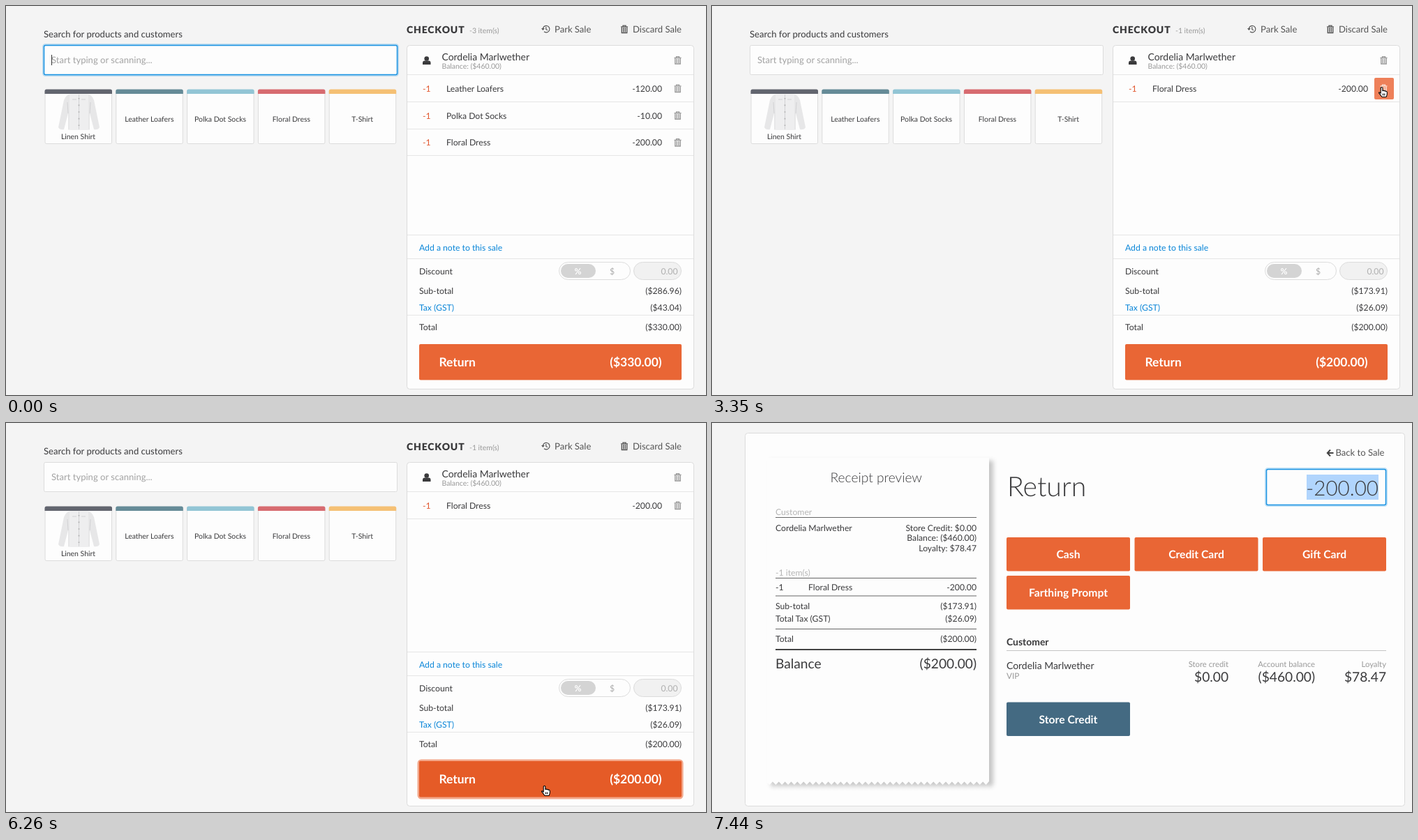
Animation of 1003x558 px, one loop 7980 ms. Source, as an HTML page:

```html
<!DOCTYPE html>
<html lang="en">
<head>
<meta charset="utf-8">
<title>Checkout return</title>
<style>
  html, body { margin: 0; width: 100%; height: 100%; overflow: hidden; background: #f4f4f4; }
  svg { display: block; width: 100%; height: 100%; }
  text { font-family: Lato, sans-serif; text-rendering: geometricPrecision; white-space: pre; }
  .paper { fill: #fdfdfd; filter: drop-shadow(6px 4px 3px rgba(0, 0, 0, .22)); }
</style>
</head>
<body>
<svg id="stage" viewBox="0 0 1003 558" xmlns="http://www.w3.org/2000/svg"></svg>
<script>
const LOOP = 7980;
const INK = '#3a3a3c', GREY = '#999', LINE = '#e6e6e6', EDGE = '#dcdcdc';
const BLUE = '#1a93e2', LINK = '#0a86d8', ORANGE = '#e96635', PRESSED = '#e55b27';
const SHOPPER = 'Cordelia Marlwether';
const ITEMS = [['Leather Loafers', 120], ['Polka Dot Socks', 10], ['Floral Dress', 200]];
const TILES = [['Linen Shirt', '#62656f'], ['Leather Loafers', '#658b97'], ['Polka Dot Socks', '#92c5d5'],
               ['Floral Dress', '#d76b70'], ['T-Shirt', '#f5c074']];
const ROW = 38.75;

// Type sizes
const S = 10.45, M = 12.2, L = 13.07, XL = 13.94, BTN = 15.68, BIG = 19.16;

// y is the middle of the capitals
const text = (x, y, size, str, { fill = INK, anchor = 'start', weight = 400, extra = '' } = {}) =>
  `<text x="${x}" y="${y + size * .36}" font-size="${size}" fill="${fill}" text-anchor="${anchor}" font-weight="${weight}" ${extra}>${str}</text>`;
const right = (x, y, size, str, opts) => text(x, y, size, str, { ...opts, anchor: 'end' });
const mid = (x, y, size, str, opts) => text(x, y, size, str, { ...opts, anchor: 'middle' });
const rect = (x, y, w, h, fill, r = 0, extra = '') =>
  `<rect x="${x}" y="${y}" width="${w}" height="${h}" rx="${r}" fill="${fill}" ${extra}/>`;
const box = (x, y, w, h, stroke, r = 3, fill = '#fdfdfd') =>
  rect(x + .5, y + .5, w - 1, h - 1, fill, r, `stroke="${stroke}"`);
const rule = (x1, x2, y, color = LINE, h = 1) => rect(x1, y, x2 - x1, h, color);
const money = v => `($${v.toFixed(2)})`;

const trash = (x, y, color) => `<g transform="translate(${x} ${y})" fill="none" stroke="${color}">
  <path d="M-5-3.7H5M-2-4V-5.4H2V-4" stroke-width="1.3"/>
  <path d="M-3.7-3V5H3.7V-3M-1.3-2.5V4M1.3-2.5V4" stroke-width="1.4"/></g>`;

const focusRing = (id, x, y, w, h) => `<g id="${id}" fill="none" stroke="${BLUE}">
  <rect x="${x - .5}" y="${y - .5}" width="${w + 1}" height="${h + 1}" rx="3" stroke-width="3" opacity=".28"/>
  <rect x="${x + .5}" y="${y + .5}" width="${w - 1}" height="${h - 1}" rx="2" stroke-width="1.5"/></g>`;

const shirt = `<path d="M92 126.500Q86 127 83 135L75 174Q77 178 83 177L89 154V177.500H120V154L126 177Q132 178 134 174L126 135Q123 127 117 126.500Z" fill="#e7e7e8"/>
  <path d="M91 127V177.500H118V127Z" fill="#eeeeef"/>
  <path d="M104.500 127V177M89 154L88 138M120 154L121 138M95 134H101M108 134H114" stroke="#d2d2d4" fill="none"/>
  <path d="M104.500 132V177" stroke="#aaa" stroke-width="1.6" stroke-dasharray="1.6 8"/>`;

function tile([name, color], i) {
  const x = 56 + i * 101.8, cx = x + 47.5;
  return box(x - .5, 120, 96.5, 78, EDGE, 2) + `<path d="M${x - .5} 126V122q0-2.500 2.500-2.500h91.500q2.500 0 2.500 2.500V126Z" fill="${color}"/>` +
    (i ? '' : shirt) + mid(cx, i ? 162 : 187, S, name);
}

function saleRow([name, price], i) {
  const y = 118.500 + i * ROW;
  return text(597, y, M, '-1', { fill: '#e2582f' }) + text(631, y, M, name) +
    right(940, y, M, '-' + price.toFixed(2)) + trash(962.5, y, GREY) + rule(575, 985, Math.round(y + 18.4));
}

function saleState(count) {
  const left = ITEMS.slice(-count);
  const total = left.reduce((sum, item) => sum + item[1], 0), tax = total * 3 / 23;
  return text(664, 35, S, `-${count} item(s)`, { fill: GREY }) + left.map(saleRow).join('') +
    right(968, 409, M, money(total - tax)) + right(968, 432.5, M, money(tax)) + right(968, 461, M, money(total)) +
    right(939.5, 511, 17.42, money(total), { fill: '#fff', weight: 700 });
}

const salePage = () =>
  text(54, 40, L, 'Search for products and customers') + box(54, 56, 507, 43, EDGE, 2) + focusRing('searchFocus', 54, 56, 507, 43) +
  text(65, 77.5, L, 'Start typing or scanning...', { fill: '#a3a3a3' }) + rect(65, 70, 1, 15, '#333', 0, 'id="caret"') +
  TILES.map(tile).join('') +
  text(574, 33.5, XL, 'CHECKOUT', { weight: 900, extra: 'letter-spacing=".87"' }) +
  `<g fill="none" stroke="#555" stroke-width="1.200"><path d="M769.300 33A4.800 4.800 0 1 1 771 36.800M773.800 30V33.500L776 34.700"/></g>
   <path d="M767 32H771.800L769.400 35Z" fill="#555"/>` +
  text(786, 33.5, L, 'Park Sale', { fill: '#555' }) + trash(886, 33.5, '#555') + text(898, 33.5, L, 'Discard Sale', { fill: '#555' }) +
  box(574, 56, 412, 494, EDGE, 4) +
  `<path d="M597 84V81.500Q597 78.500 600 78.500H605.500Q608.500 78.500 608.500 81.500V84Z" fill="${INK}"/><circle cx="602.700" cy="75.500" r="3.300" fill="${INK}"/>` +
  text(624.5, 72.5, XL, SHOPPER) + text(624.5, 86, S, 'Balance: ($460.00)', { fill: GREY }) + trash(962.5, 78, GREY) +
  rule(575, 985, 98) + rule(575, 985, 328) + rule(575, 985, 362) + rule(575, 985, 443) +
  text(592, 346.5, M, 'Add a note to this sale', { fill: LINK }) + text(592, 381, M, 'Discount') +
  box(792, 367, 103, 26, EDGE, 13) + rect(795, 370, 50, 20, '#d4d4d4', 10) +
  mid(819.5, 380.5, M, '%', { fill: '#fff', weight: 700 }) + mid(868.5, 380.5, M, '$', { fill: '#aaa' }) +
  box(899, 367, 69, 26, EDGE, 13, '#f1f1f1') + right(962.5, 380.5, M, '0.00', { fill: '#b0b0b0' }) +
  text(592, 409, M, 'Sub-total') + text(592, 432.5, M, 'Tax (GST)', { fill: LINK }) + text(592, 461, M, 'Total') +
  rect(591, 484, 378, 54, 'none', 4, 'id="glow" stroke="#f3a78a" stroke-width="3"') +
  rect(592, 485, 376, 51.5, ORANGE, 2) + rect(592, 485, 376, 51.5, PRESSED, 2, 'id="press"') +
  text(620.5, 511, 17.42, 'Return', { fill: '#fff', weight: 700 }) +
  '<g id="state"></g><g id="hover">' + rect(949, 103, 28, 31, '#ee8059', 2) + trash(962.5, 118.5, '#fbe3da') + '</g>';

function paper() {
  let d = 'M78 50H397V514';
  for (let x = 397, i = 1; x > 82; i++) d += `L${x -= 4.43} ${i % 2 ? 519 : 514.5}`;
  return `<path class="paper" d="${d}L78 516Z"/>`;
}

function payButton(label, col, y, fill = ORANGE) {
  const x = 422 + col * 183.5;
  return rect(x, y, 177, 48.5, fill, 2) + mid(x + 88.5, y + 24.5, BTN, label, { fill: '#fff', weight: 700 });
}

const receiptLine = (y, label, value) => text(91, y, M, label) + right(379, y, M, value);
const account = (x, label, value) =>
  right(x, 346, 11.3, label, { fill: GREY }) + right(x, 364.5, BIG, value);

const payPage = () => box(47, 14, 946, 536, EDGE, 4) + paper() +
  mid(235.3, 78.5, BIG, 'Receipt preview', { weight: 300 }) +
  text(91, 128, M, 'Customer', { fill: '#b5b5b5' }) + rule(91, 379, 135, '#666') +
  receiptLine(150.5, SHOPPER, 'Store Credit: $0.00') +
  right(379, 165, M, 'Balance: ($460.00)') + right(379, 179.5, M, 'Loyalty: $78.47') +
  text(91, 215, M, '-1 item(s)', { fill: '#b5b5b5' }) + rule(91, 379, 222, '#666') +
  receiptLine(235.5, '-1', '-200.00') + text(138, 235.5, M, 'Floral Dress') + rule(91, 379, 247.5, '#666') +
  receiptLine(263, 'Sub-total', '($173.91)') + receiptLine(281, 'Total Tax (GST)', '($26.09)') + rule(91, 379, 295, '#666') +
  receiptLine(310, 'Total', '($200.00)') + rule(91, 379, 324, '#444', 2) +
  text(91, 345, BIG, 'Balance') + right(379, 345, BIG, '($200.00)') +
  text(423, 90.5, 39.2, 'Return', { weight: 300 }) +
  '<path d="M890.500 43H882.500M886 38.500L881.800 43L886 47.500" fill="none" stroke="#444" stroke-width="2"/>' +
  text(893.5, 42.5, L, 'Back to Sale', { fill: '#555' }) +
  box(794, 66, 172, 52, EDGE, 2) + '<g id="amountFocus">' + rect(852, 74, 103, 36, '#b1d5fd') + focusRing('ring', 794, 66, 172, 52) + '</g>' +
  right(955, 93, 29.6, '-200.00', { weight: 300 }) +
  payButton('Cash', 0, 164) + payButton('Credit Card', 1, 164) + payButton('Gift Card', 2, 164) + payButton('Farthing Prompt', 0, 219) +
  text(422, 314, XL, 'Customer', { weight: 700 }) + rule(422, 966, 326, '#c4c4c4') +
  text(422, 347.5, XL, SHOPPER) + text(422, 363, 11.8, 'VIP', { fill: GREY }) +
  account(740, 'Store credit', '$0.00') + account(864, 'Account balance', '($460.00)') + account(966, 'Loyalty', '$78.47') +
  payButton('Store Credit', 0, 400.5, '#446a82');

const pointers = `<g id="pointer">
  <path id="arrow" d="M0 0V12.500L3 9.800L5 14.500L7.200 13.500L5.200 9H9Z" fill="#000" stroke="#fff" stroke-width="1"/>
  <path id="hand" d="M-1.300.9Q0-.8 1.300.9V5Q2.600 4 3.700 5.300Q5 4.600 6 6Q7.600 5.500 7.800 7.300V10Q7.500 12 6.500 14H.5Q-1.500 11.500-4 8.200Q-3.800 6.500-1.300 8.500Z M2 9V12M4.200 9V12" fill="#fff" stroke="#000" stroke-width="1.100"/></g>`;

const stage = document.getElementById('stage');
stage.innerHTML = rect(0, 0, 1003, 558, '#f4f4f4') +
  `<g id="sale">${salePage()}</g><g id="pay">${payPage()}</g>${pointers}`;
const el = {};
stage.querySelectorAll('[id]').forEach(node => el[node.id] = node);

// Held values: [time, value]
const COUNT = [[0, 3], [2030, 2], [3350, 1]];
const FOCUS = [[0, 1], [1850, .5], [1940, 0], [2030, .5], [2120, 1], [3260, .5], [3350, 0], [3440, 1], [6170, .4], [6260, 0]];
const CARET = [[0, 1], [450, 0], [960, 1], [1410, 0], [2270, 1], [2720, 0], [3260, 1], [3950, 0], [4460, 1], [5000, 0], [5540, 1], [6000, 0]];
const PRESS = [[0, 0], [6170, .5], [6260, 1]];
const SALE = [[0, 1], [6500, .6], [6580, .25], [6730, 0]];
const PAY = [[0, 0], [6500, .4], [6580, .75], [6730, 1]];
const SLIDE = [[0, 40], [6580, 34], [6730, 22], [6880, 0]];
const held = (track, t) => track.findLast(key => key[0] <= t)[1];

// Pointer path: [time, x, y], sampled every 90 ms
const PATH = [[600, 994, 191], [780, 980, 165], [1050, 959.5, 116.5], [3590, 959.5, 116.5], [3770, 978, 150], [3950, 955, 205],
  [4290, 869, 243], [4380, 849, 261], [4460, 832, 318], [4550, 806, 381], [4820, 795, 425], [5000, 783, 470], [5150, 773, 497],
  [5330, 772, 501.5], [5580, 771.5, 520.5], [6880, 771.5, 520.5], [7030, 784, 528], [7180, 815, 536], [7350, 893, 552], [7440, 920, 580]];

function pointerAt(t) {
  const i = PATH.findLastIndex(key => key[0] <= t);
  if (i < 0 || i === PATH.length - 1) return null;
  const [t0, x0, y0] = PATH[i], [t1, x1, y1] = PATH[i + 1];
  const k = Math.floor((t - t0) / 90) * 90 / (t1 - t0);
  return { x: x0 + (x1 - x0) * k, y: y0 + (y1 - y0) * k };
}

const show = (node, opacity) => node.setAttribute('opacity', +opacity);
const move = (node, x, y) => node.setAttribute('transform', `translate(${x} ${y})`);
let shown = 0;

function draw(t) {
  const count = held(COUNT, t), focus = held(FOCUS, t), press = held(PRESS, t);
  if (count !== shown) el.state.innerHTML = saleState(shown = count);
  show(el.searchFocus, focus);
  show(el.caret, focus === 1 && held(CARET, t));
  show(el.press, press);
  show(el.glow, press);
  show(el.sale, held(SALE, t));
  show(el.pay, held(PAY, t));
  move(el.pay, 0, held(SLIDE, t));
  show(el.amountFocus, t >= 7030);

  const p = pointerAt(t);
  show(el.pointer, !!p);
  show(el.hover, 0);
  if (!p) return;
  const row = Math.floor((p.y - 103) / ROW);
  const overTrash = t < 6500 && p.x > 949 && p.x < 977 && row >= 0 && row < count && p.y - 103 - row * ROW < 31;
  const overButton = t < 6500 && p.y > 485;
  show(el.hover, overTrash);
  move(el.hover, 0, row * ROW);
  show(el.hand, overTrash || overButton);
  show(el.arrow, !(overTrash || overButton));
  move(el.pointer, p.x, p.y);
}

const start = performance.now();
function tick() {
  draw((performance.now() - start) % LOOP);
  requestAnimationFrame(tick);
}
tick();
</script>
</body>
</html>
```
